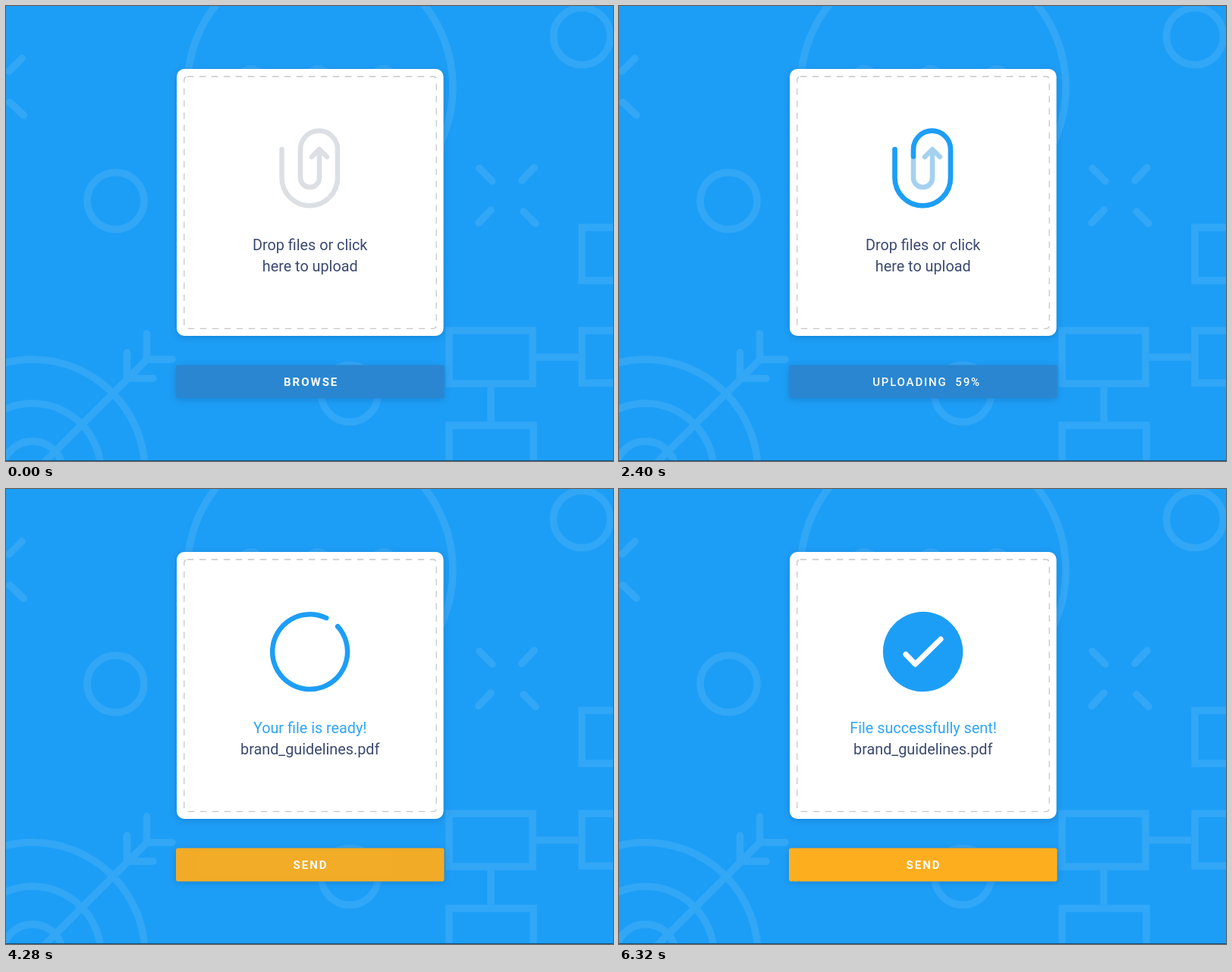
These frames come from a looping animation (800x600 px, 7000 ms). An HTML page:

```html
<!DOCTYPE html>
<html lang="en">
<head>
<meta charset="utf-8">
<title>File upload</title>
<style>
  html, body { margin: 0; height: 100%; overflow: hidden; background: #1d9ef6; }
  svg { display: block; width: 100%; height: 100%; }
  text { font: 19.8px Roboto, sans-serif; fill: #3b4a70; }
  .mid { text-anchor: middle; }
  .accent { fill: #2fa6f5; }
  .label { font-size: 15px; font-weight: 500; letter-spacing: 1.8px; fill: #fff; }
  .bold { font-weight: 700; letter-spacing: 2px; }
  .line { fill: none; stroke-linecap: round; stroke-linejoin: round; }
  .clip { stroke-width: 6.5; }
  .blue { stroke: #1d9ef6; }
  #pattern { stroke: #fff; stroke-width: 9.5; opacity: .09; }
</style>
</head>
<body>
<svg viewBox="0 0 800 600">
  <defs>
    <filter id="soft" x="-20%" y="-50%" width="140%" height="200%">
      <feDropShadow dx="0" dy="2" stdDeviation="5" flood-color="#0a4c8c" flood-opacity=".3"/>
    </filter>
    <path id="clipPath" pathLength="1" d="M363.5 189V226.5a36.75 36.75 0 0 0 73.5 0V189a24.5 24.5 0 0 0-49 0V226.5a12.5 12.5 0 0 0 25 0V190"/>
    <path id="head" d="M403 199l10-10 10 10"/>
  </defs>
  <rect width="800" height="600" fill="#1d9ef6"/>

  <g id="pattern" class="line">
    <circle cx="414" cy="107" r="175"/>
    <circle cx="323" cy="98" r="15"/><circle cx="411" cy="98" r="15"/><circle cx="498" cy="98" r="15"/>
    <circle cx="759" cy="40" r="37.5"/>
    <circle cx="144.5" cy="257" r="37.5"/>
    <circle cx="453" cy="511" r="37.5"/>
    <circle cx="35" cy="614" r="148"/><circle cx="35" cy="614" r="90"/><circle cx="35" cy="614" r="40"/>
    <path d="M50 602L186 466M185.5 432V466H219M159.500 457V491H194"/>
    <path d="M624 214l17 17M696 213l-16 17M639 269l-16 17M682 271l16 16M21 69L4 86M5 127l18 17"/>
    <path stroke-linejoin="miter" stroke-linecap="butt"
      d="M584 428H694V498H584ZM820 428H759V497H820M820 292H759V362H820M584 620V553H695V620M699 463H754M639 503V548"/>
  </g>

  <rect x="225" y="83" width="351.500" height="352" rx="10" fill="#fff" filter="url(#soft)"/>
  <g fill="none" stroke-width="1.3" stroke-dasharray="8.5 7.500">
    <rect x="234.800" y="93" width="332.400" height="332.400" rx="4" stroke="#c6c7ca"/>
    <rect id="march" x="234.800" y="93" width="332.400" height="332.400" rx="4" stroke="#55aeea"/>
  </g>

  <g id="clip" class="line clip">
    <g id="base"><use href="#clipPath"/><use href="#head"/></g>
    <use id="trace" class="blue" href="#clipPath"/>
    <use id="traceHead" class="blue" href="#head"/>
  </g>

  <g id="done">
    <path id="ring" class="line blue"/>
    <path id="check" class="line" stroke="#fff" stroke-width="7" pathLength="1" d="M378 218l12.500 13L424 198"/>
  </g>

  <g id="prompt" class="mid">
    <text x="400.700" y="321.500">Drop files or click</text>
    <text x="400.700" y="349.500">here to upload</text>
  </g>
  <text id="ready" class="mid accent" x="400.700" y="321.500">Your file is ready!</text>
  <text id="sent" class="mid accent" x="401" y="321.500">File successfully sent!</text>
  <text id="fileName" class="mid" x="400.700" y="349.500">brand_guidelines.pdf</text>

  <rect x="224" y="473.500" width="353.500" height="43.500" rx="2" fill="#2b86d1" filter="url(#soft)"/>
  <text id="browse" class="label bold" x="366" y="501">BROWSE</text>
  <g id="uploading">
    <text class="label" x="334.200" y="501">UPLOADING</text>
    <text id="percent" class="label" x="476.800" y="501" text-anchor="end"></text>
  </g>
  <g id="send">
    <rect x="224" y="473.500" width="353.500" height="44" rx="3" fill="#fcae1f"/>
    <text class="label bold" x="378.500" y="501">SEND</text>
  </g>

  <g id="drag">
    <g id="picture">
      <g class="line" stroke="#d4d4e0" stroke-width="3.500">
        <rect x="-33" y="-33" width="66" height="66" fill="#fff" stroke-linejoin="miter"/>
        <circle cx="13" cy="-13" r="6"/>
        <path d="M-32 32L-9 -4 16 32M8 19L18 7 32 25"/>
      </g>
      <text class="mid accent" y="60" style="font:16px 'Noto Sans',sans-serif">Image.jpg</text>
    </g>
    <path class="line" style="fill:#fff" stroke="#2b2b33" stroke-width="2"
      d="M24 24V10a3 3 0 0 1 6 0V18q5-2 6 2 4-2 5 2 4-1 4 4V31q0 4-3 7V40H27V37q-4-4-6-8l-3-5q0-4 3-3Z"/>
  </g>
  <rect y="599" width="800" height="1" fill="#0f4f80"/>
</svg>
<script>
const $ = id => document.getElementById(id);
const LOOP = 7000, CX = 400.6, CY = 214.6;

const linear = x => x;
const cubic = x => x < .5 ? 4 * x ** 3 : 1 - 4 * (1 - x) ** 3;
const quad = x => x < .5 ? 2 * x * x : 1 - 2 * (1 - x) ** 2;
const ramp = (t, from, to, ease = linear) =>
  ease(Math.min(1, Math.max(0, (t - from) / (to - from))));
const mix = (a, b, p) => a + (b - a) * p;
const fade = (id, opacity) => $(id).setAttribute('opacity', opacity);
const pose = (id, x, y, scale, angle = 0) => $(id).setAttribute('transform',
  `translate(${x} ${y}) rotate(${angle}) scale(${scale}) translate(${-x} ${-y})`);

// Shows the part of a path of length 1 between two fractions.
function trim(id, from, to) {
  const el = $(id), visible = to - from > .001;
  el.style.display = visible ? '' : 'none';
  el.setAttribute('stroke-dasharray', `0 ${from} ${to - from} 2`);
}

function drawDrag(t) {
  const move = ramp(t, 160, 900, cubic), drop = ramp(t, 920, 1240, quad);
  $('drag').setAttribute('transform', `translate(${mix(860, 425, move)} ${mix(320, 198, move)})`);
  $('picture').setAttribute('transform', `scale(${1 - .5 * drop})`);
  fade('picture', 1 - drop);
  fade('drag', t < 160 ? 0 : 1 - ramp(t, 1000, 1300));
}

function drawClip(t) {
  const hover = ramp(t, 600, 840);
  const progress = ramp(t, 1200, 3230);
  const drawn = cubic(progress), leave = ramp(t, 3480, 3980, cubic);
  const pop = Math.sin(Math.PI * ramp(t, 3230, 3480));
  const rgb = [[220, 165], [223, 209], [227, 240]].map(([a, b]) => mix(a, b, hover));

  fade('march', hover - ramp(t, 1100, 1500));
  $('march').setAttribute('stroke-dashoffset', -t * .03);
  pose('clip', CX, CY, 1 + .07 * (hover - ramp(t, 920, 1240, quad)) + .04 * pop, -87 * leave);
  $('base').setAttribute('stroke', `rgb(${rgb})`);
  fade('base', progress < 1 ? 1 : 0);
  trim('trace', leave, drawn);
  fade('traceHead', ramp(drawn, .96, 1) - ramp(leave, .93, 1));
  $('percent').textContent = Math.round(progress * 100) + '%';
}

function drawDone(t, scale) {
  const sweep = ramp(t, 3520, 4440, quad), fill = ramp(t, 4480, 4840, quad);
  const width = mix(6.5, 52.6, fill), r = 52.7 - width / 2;
  const start = -4.5 - 40.3 * sweep;
  const point = deg => [CX + r * Math.cos(deg * Math.PI / 180), CY + r * Math.sin(deg * Math.PI / 180)];
  const arc = deg => `A${r} ${r} 0 0 1 ${point(start + deg)}`;
  $('ring').setAttribute('d', `M${point(start)}` + arc(120 * sweep) + arc(240 * sweep) + arc(359.9 * sweep));
  $('ring').setAttribute('stroke-width', width);
  $('ring').setAttribute('stroke-linecap', fill > 0 ? 'butt' : 'round');
  $('ring').style.strokeLinecap = fill > 0 ? 'butt' : 'round';
  fade('ring', sweep > 0 ? 1 - 2.9 * Math.max(0, 1 - scale) : 0);
  trim('check', 0, ramp(t, 4640, 4960, quad));
  pose('done', CX, CY, scale);
}

function draw(t) {
  const started = ramp(t, 1000, 1300), finished = ramp(t, 3800, 4305);
  const sent = ramp(t, 5840, 6320);
  const press = 1 - .08 * ramp(t, 5120, 5480, cubic)
    + .095 * ramp(t, 5480, 5920, cubic) - .015 * ramp(t, 5920, 6200, cubic);

  drawDrag(t);
  drawClip(t);
  drawDone(t, press);
  fade('prompt', 1 - ramp(t, 3800, 4040));
  fade('ready', ramp(t, 4000, 4240) - sent);
  fade('fileName', ramp(t, 4000, 4240));
  fade('sent', sent);
  fade('browse', 1 - started);
  fade('uploading', started - finished);
  fade('send', finished);
  pose('send', 400.7, 495.4, Math.min(1, press));
}

const begin = performance.now();
function tick() {
  draw((performance.now() - begin) % LOOP);
  requestAnimationFrame(tick);
}
tick();
</script>
</body>
</html>
```
